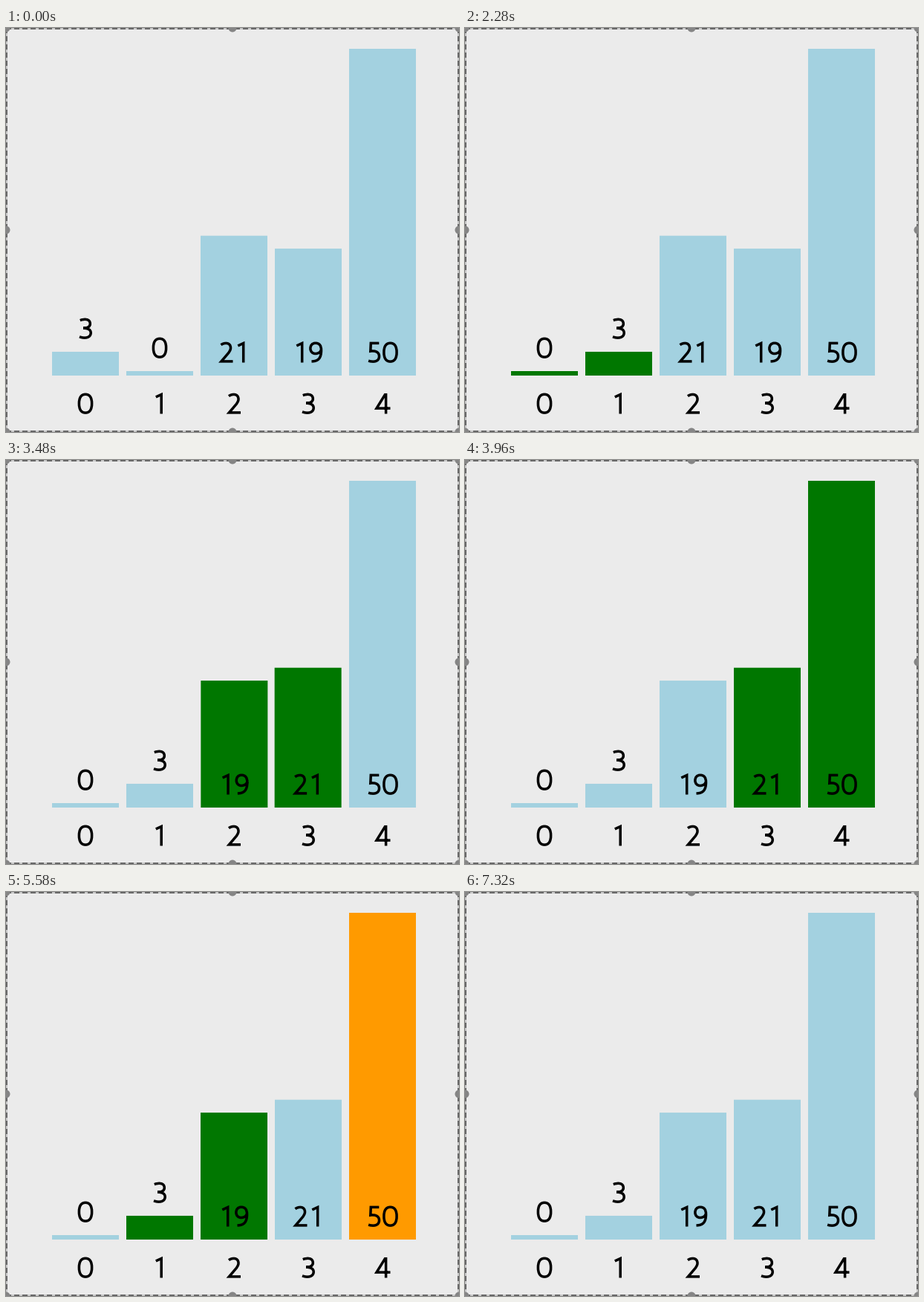
A matplotlib script for the animation above (7380 ms loop, 610 by 544 pixels).

```python
import matplotlib.pyplot as plt
import numpy as np
from matplotlib.animation import FuncAnimation
from matplotlib.colors import to_rgb
from matplotlib.patches import Circle, PathPatch, Rectangle
from matplotlib.path import Path
from matplotlib.transforms import Affine2D

W, H, DPI = 610, 544, 64
STEP, FRAMES = 60, 123
BASE, SLOT, BAR_W, ADVANCE = 468, 100, 90, 21
BLUE, GREEN, ORANGE = (np.array(to_rgb(c)) for c in ("#a3d1e0", "#007700", "#ff9a00"))

VALUES = [3, 0, 21, 19, 50]

# start time, order of the bars by slot, compared slots, sorted slots
STATES = [
    (0, (0, 1, 2, 3, 4), (), ()),
    (1680, (0, 1, 2, 3, 4), (0, 1), ()),
    (2100, (1, 0, 2, 3, 4), (0, 1), ()),
    (2520, (1, 0, 2, 3, 4), (1, 2), ()),
    (2940, (1, 0, 2, 3, 4), (2, 3), ()),
    (3360, (1, 0, 3, 2, 4), (2, 3), ()),
    (3780, (1, 0, 3, 2, 4), (3, 4), ()),
    (4200, (1, 0, 3, 2, 4), (), (4,)),
    (5040, (1, 0, 3, 2, 4), (0, 1), (4,)),
    (5460, (1, 0, 3, 2, 4), (1, 2), (4,)),
    (5880, (1, 0, 3, 2, 4), (2, 3), (4,)),
    (6300, (1, 0, 3, 2, 4), (), (3, 4)),
    (6720, (1, 0, 3, 2, 4), (), ()),
]

# pen strokes per digit, y up from the baseline, x from the middle
DIGITS = {
    "0": "M 0 26.2 C 6 26.2 8.6 21.5 8.6 13.8 C 8.6 6.2 6 1.4 0 1.4 "
         "C -6 1.4 -8.6 6.2 -8.6 13.8 C -8.6 21.5 -6 26.2 0 26.2 Z",
    "1": "M -5.2 22.6 L 2.2 26 L 2.2 0",
    "2": "M -7 23.8 C -3 27 6 27.8 6 19.6 C 6 14.5 -1 8.5 -6.6 1.6 L 9 1.6",
    "3": "M -7.2 24.8 C -2 27 6.3 27.2 6.3 20.2 C 6.3 16 2.5 14.3 -2.8 14.3 "
         "C 3 14.3 7.2 12.5 7.2 8 C 7.2 1 -1.5 0 -8 2.7",
    "4": "M 4.6 0 L 4.6 25.8 L 3.4 25.8 L -8 7.4 L 10.5 7.4",
    "5": "M 5.8 26.1 L -5.2 26.1 L -5.7 15.3 C -1 16.2 6 15.2 6 8.4 C 6 1 -2 0.2 -8.4 2.4",
    "9": "M -6 1.6 C 3 1.6 7 6 7 16.5 C 7 23 4.5 26.2 -0.8 26.2 "
         "C -5.5 26.2 -7.6 22.8 -7.6 19 C -7.6 14.5 -4.5 12 -1 12 C 3 12 6 14 7 17",
}


def px(n):
    return n * 72 / DPI


def parse(spec):
    """Turn a short M/L/C/Z string into vertices and codes."""
    kinds = {"M": Path.MOVETO, "L": Path.LINETO, "C": Path.CURVE4}
    nums, codes, kind = [], [], None
    for word in spec.split():
        if word in kinds:
            kind = kinds[word]
        elif word == "Z":
            nums += [0, 0]
            codes.append(Path.CLOSEPOLY)
        else:
            nums.append(float(word))
            if len(nums) % 2 == 0:
                codes.append(kind)
    return np.reshape(nums, (-1, 2)), codes


def number_path(text):
    verts, codes = [], []
    for i, ch in enumerate(text):
        v, c = parse(DIGITS[ch])
        verts.append(v + [(i - (len(text) - 1) / 2) * ADVANCE, 0])
        codes += c
    return Path(np.vstack(verts), codes)


def add_number(text, x, y):
    """Draw a number and return the transform that places it."""
    place = Affine2D().scale(1, -1).translate(x, y)
    ax.add_patch(PathPatch(number_path(text), fc="none", ec="black", lw=px(3.5),
                           capstyle="butt", joinstyle="miter", zorder=3,
                           transform=place + ax.transData))
    return place


def slot_x(slot):
    return 62 + SLOT * slot


def bar_height(value):
    return 6 + 8.68 * value


def text_y(value):
    h = bar_height(value)
    return (BASE if h > 60 else BASE - h) - 17.5


def pose(state):
    """Slot and colour of every bar in a state."""
    _, order, compared, done = state
    slots, colors = np.zeros(5), np.zeros((5, 3))
    for slot, bar in enumerate(order):
        slots[bar] = slot
        colors[bar] = ORANGE if slot in done else GREEN if slot in compared else BLUE
    return slots, colors


def ease(p):
    p = min(max(p, 0), 1)
    return 4 * p ** 3 if p < 0.5 else 1 - 4 * (1 - p) ** 3


def draw_border():
    edges = [((0, W), (1, 1)), ((0, W), (H - 1, H - 1)),
             ((1, 1), (0, H)), ((W - 1, W - 1), (0, H))]
    for xs, ys in edges:
        ax.plot(xs, ys, color="#c6c6c6", lw=px(2), zorder=4)
        ax.plot(xs, ys, color="#686868", lw=px(2), zorder=5,
                ls=(0, (3.5, 2)), dash_capstyle="butt")
    for x in (0, W / 2, W):
        for y in (0, H / 2, H):
            if (x, y) != (W / 2, H / 2):
                ax.add_patch(Circle((x, y), 5.5, fc="#858585", lw=0, zorder=6))


plt.rcParams["toolbar"] = "None"
fig = plt.figure(figsize=(W / DPI, H / DPI), dpi=DPI, facecolor="#ebebeb")
ax = fig.add_axes([0, 0, 1, 1])
ax.set(xlim=(0, W), ylim=(H, 0))
ax.axis("off")

bars, places = [], []
for slot, value in enumerate(VALUES):
    h = bar_height(value)
    bar = Rectangle((slot_x(slot), BASE - h), BAR_W, h, lw=0, fc=BLUE, zorder=2, snap=False)
    bars.append(ax.add_patch(bar))
    places.append(add_number(str(value), slot_x(slot) + BAR_W / 2, text_y(value)))
    add_number(str(slot), slot_x(slot) + BAR_W / 2, 519.5)
draw_border()
ax.set(xlim=(0, W), ylim=(H, 0))


def update(frame):
    t = frame * STEP
    now = max(i for i, s in enumerate(STATES) if s[0] <= t)
    slots0, colors0 = pose(STATES[max(now - 1, 0)])
    slots1, colors1 = pose(STATES[now])
    k = ease((t - STATES[now][0] + 22) / 157)
    slots = slots0 + (slots1 - slots0) * k
    colors = colors0 + (colors1 - colors0) * k
    for bar, place, value, slot, color in zip(bars, places, VALUES, slots, colors):
        x = slot_x(slot)
        bar.set_x(x)
        bar.set_facecolor(color)
        place.clear().scale(1, -1).translate(x + BAR_W / 2, text_y(value))
    return bars


anim = FuncAnimation(fig, update, frames=FRAMES, interval=STEP, repeat=True, repeat_delay=0)
plt.show()
```
